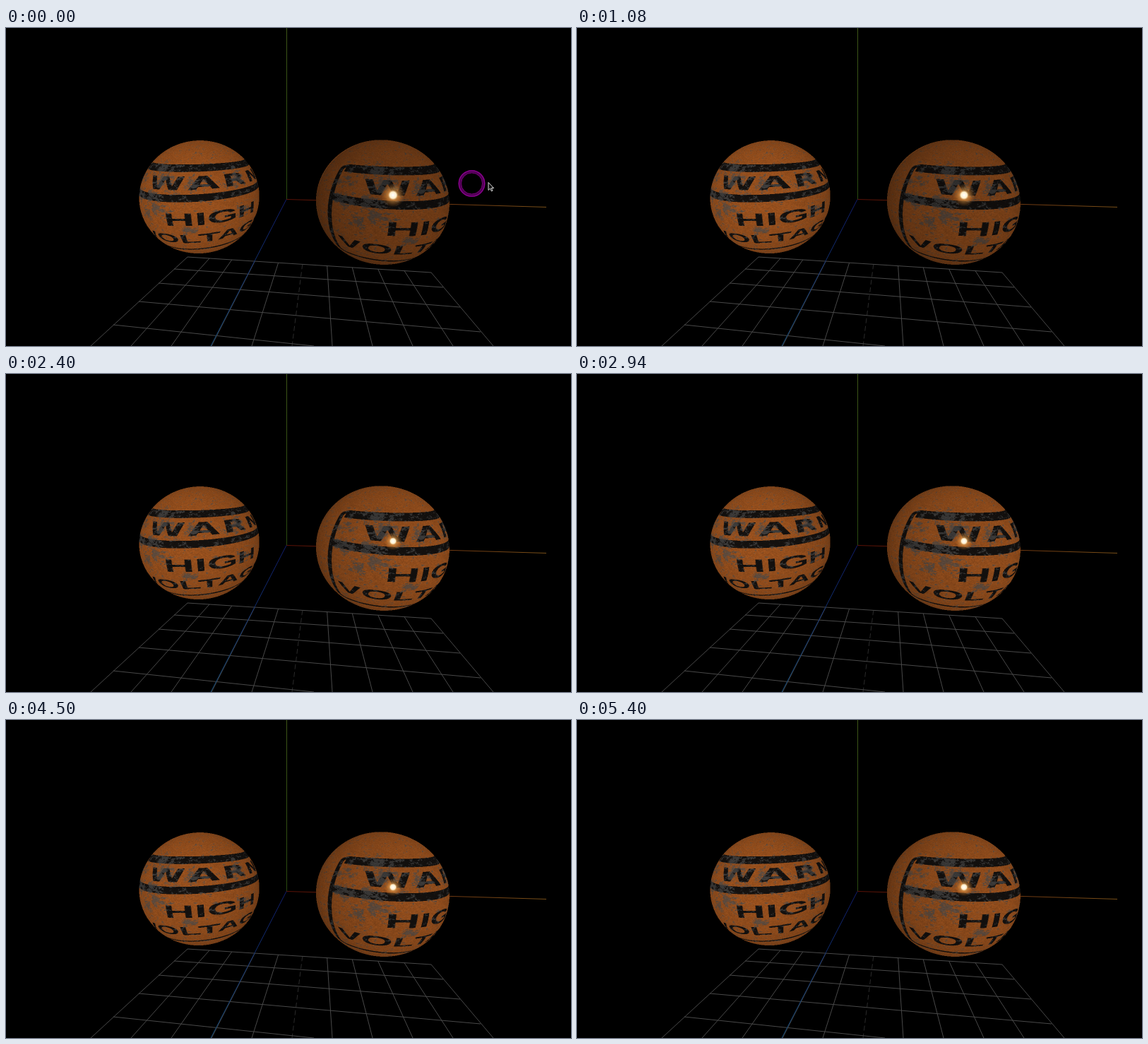
Write an HTML page with a canvas that moves like this. It is 800 px wide and 450 px high and loops after 5.7 s.

```html
<!DOCTYPE html>
<html lang="en">
<head>
<meta charset="utf-8">
<title>Two textured spheres</title>
<style>
html, body { margin: 0; width: 100%; height: 100%; overflow: hidden; background: #000; }
canvas { display: block; width: 800px; height: 450px; }
</style>
</head>
<body>
<canvas id="stage" width="800" height="450"></canvas>
<script>
const LOOP = 5700, W = 800, H = 450;
const ctx = document.getElementById('stage').getContext('2d');
const clamp = v => Math.max(0, Math.min(1, v));
const mix = (a, b, k) => a + (b - a) * k;

function makeCanvas(w, h) {
  const c = document.createElement('canvas');
  c.width = w;
  c.height = h;
  return c.getContext('2d', { willReadFrequently: true });
}

// ---- Sign texture: black print mask wrapped round the whole sphere ----
const TW = 930, TH = 1024;
const mapX = lon => (lon + 180) / 360 * TW;
const mapY = lat => (90 - lat) / 180 * TH;

function signMask() {
  const g = makeCanvas(TW, TH);
  const bar = (lon0, lon1, top, bottom) =>
    g.fillRect(mapX(lon0), mapY(top), mapX(lon1) - mapX(lon0), mapY(bottom) - mapY(top));
  const label = (text, lon, lat, em, face, gap = 0) => {
    g.font = `bold ${em / 180 * TH}px ${face}, sans-serif`;
    g.letterSpacing = gap + 'px';
    g.fillText(text, mapX(lon), mapY(lat));
  };
  g.lineWidth = 13;
  g.beginPath();
  g.roundRect(mapX(-53), mapY(40.5), mapX(138) - mapX(-53), mapY(-42) - mapY(40.5), 26);
  g.stroke();
  bar(-48, 134, 41, 34.5);
  bar(-53, 138, 15.3, 9.3);
  label('WARNING', -26, 19, 15.8, '"DejaVu Sans"', 9);
  label('HIGH', -7, -11, 16, '"Liberation Sans"');
  label('VOLTAGE', -46, -30.5, 15, '"Liberation Sans"');
  return g.getImageData(0, 0, TW, TH).data;
}

// ---- Seeded noise ----
function hash(x, y) {
  let h = Math.imul(x, 374761393) + Math.imul(y, 668265263) | 0;
  h = Math.imul(h ^ h >>> 13, 1274126177);
  return ((h ^ h >>> 16) >>> 0) / 4294967296;
}
function noise(x, y) {
  const ix = Math.floor(x), iy = Math.floor(y);
  const ease = v => v * v * (3 - 2 * v);
  const fx = ease(x - ix), fy = ease(y - iy);
  const row = j => mix(hash(ix, j), hash(ix + 1, j), fx);
  return mix(row(iy), row(iy + 1), fy);
}
const fbm = (x, y) =>
  .4 * noise(x, y) + .3 * noise(x * 2.3, y * 2.3) + .3 * noise(x * 5.1, y * 5.1);

// ---- Spheres, ray traced through a tilted camera ----
const FOCAL = 335, PITCH = .206, YAW = .122;
const spheres = [
  { x: 280.4, y: 238.3, dist: 4.58, box: [186, 156, 362, 322], gain: 1 },
  { x: 524.8, y: 245.2, dist: 4.2, box: [437, 156, 631, 338], gain: .95 }
];
// Worn spots: longitude, latitude, radius
const worn = [[-15, 3, 12], [-38, 12, 10], [-40, 27, 9], [-8, 27, 12], [20, 25, 9],
  [-18, 37, 10], [64, -4, 9], [60, 26, 12], [-26, -4, 9], [12, -15, 7], [-20, 15, 9]];

function surface(lon, lat, mask) {
  const i = Math.floor(mapY(lat)) * TW + Math.floor(mapX(lon));
  const ink = mask[i * 4 + 3] / 255;
  let near = 0;
  for (const [a, b, r] of worn)
    near = Math.max(near, 1 - Math.hypot((lon - a) * .7, lat - b) / r);
  const rough = fbm(lon / 4 + 90, lat / 2 + 90);
  const wear = clamp((rough + near * .3 - .64 + ink * .07) * 8) * .75;
  const grain = .9 + .2 * noise(lon * 1.6 + 500, lat * 2.6 + 500);
  const blotch = .9 + .2 * rough;
  return [[153, 20, 76], [81, 17, 75], [30, 15, 74]].map(([paint, black, metal]) =>
    mix(mix(paint * blotch, black, ink), metal, wear) * grain);
}

function renderSpheres() {
  const mask = signMask(), K = 2;
  const g = makeCanvas(W * K, H * K);
  const img = g.createImageData(W * K, H * K);
  const cp = Math.cos(PITCH), sp = Math.sin(PITCH), cy = Math.cos(YAW), sy = Math.sin(YAW);
  for (const s of spheres) {
    const c = [s.x - 400, 225 - s.y, -FOCAL];
    const scale = s.dist / Math.hypot(...c);
    const [cx, cY, cz] = c.map(v => v * scale);
    const [x0, y0, x1, y1] = s.box.map(v => v * K);
    for (let py = y0; py < y1; py++) for (let px = x0; px < x1; px++) {
      const rx = (px + .5) / K - 400, ry = 225 - (py + .5) / K;
      const len = Math.hypot(rx, ry, FOCAL);
      const b = (rx * cx + ry * cY - FOCAL * cz) / len;
      const disc = b * b - s.dist * s.dist + 1;
      if (disc < 0) continue;
      const t = (b - Math.sqrt(disc)) / len;
      const nx = rx * t - cx, ny = ry * t - cY, nz = -FOCAL * t - cz;
      const wy = ny * cp + nz * sp, depth = nz * cp - ny * sp;
      const wx = nx * cy + depth * sy, wz = depth * cy - nx * sy;
      const lon = Math.atan2(wx, wz) * 180 / Math.PI;
      const lat = Math.asin(wy) * 180 / Math.PI;
      const light = s.gain * (.7 + .3 * clamp(nx * .12 + ny * .1 + nz));
      const rgb = surface(lon, lat, mask);
      const o = (py * W * K + px) * 4;
      for (let k = 0; k < 3; k++) img.data[o + k] = rgb[k] * light;
      img.data[o + 3] = 255;
    }
  }
  g.putImageData(img, 0, 0);
  return g.canvas;
}

// ---- Lines ----
function line(x0, y0, x1, y1, from, to = from, dash = []) {
  const grad = ctx.createLinearGradient(x0, y0, x1, y1);
  grad.addColorStop(0, from);
  grad.addColorStop(1, to);
  ctx.strokeStyle = grad;
  ctx.lineWidth = 1;
  ctx.setLineDash(dash);
  ctx.beginPath();
  ctx.moveTo(x0, y0);
  ctx.lineTo(x1, y1);
  ctx.stroke();
  ctx.setLineDash([]);
}

function drawGrid() {
  const grey = '#484848', faint = '#2a2a2a';
  for (let i = 0; i <= 10; i++) {
    const x = 257 + 30.6 * i + .39 * i * i;
    const broken = i === 5;
    line(x, 324 + (x - 257) * .0638, 120 + 57 * i, 450,
      broken ? faint : grey, undefined, broken ? [7, 4] : []);
  }
  const rows = [[257, 324, 602, 346], [238, 341, 619, 367], [216, 361, 643, 395],
    [188, 387, 672, 430], [152, 420, 436, 450]];
  for (const r of rows) line(...r, grey);
}

function drawAxes() {
  line(397.5, 242, 397.5, 0, '#2a4a10', '#3e5618');
  line(397, 242.5, 765, 253.5, '#5a1006', '#7a5018');
  line(397, 242.5, 290, 450, '#101c6c', '#124a78');
}

// ---- Light on the right sphere: dim with a wide warm glint, then settling ----
function drawLight(t) {
  const dim = 1 - clamp((t - 960) / 540);
  ctx.fillStyle = `rgba(0,0,0,${.24 * dim})`;
  ctx.beginPath();
  ctx.ellipse(533.7, 246.7, 94.8, 88.7, 0, 0, 7);
  ctx.fill();

  const r = 13 + 4 * dim;
  const g = ctx.createRadialGradient(548, 236.5, 0, 548, 236.5, r);
  g.addColorStop(0, '#fff');
  g.addColorStop(.27, '#fff0cc');
  g.addColorStop(.42, 'rgba(240,165,80,.6)');
  g.addColorStop(1, 'rgba(200,110,30,0)');
  ctx.fillStyle = g;
  ctx.fillRect(548 - r, 236.5 - r, 2 * r, 2 * r);
}

// The arrow slows down to the right while its ring catches up
function drawPointer(t) {
  if (t >= 240) return;
  const left = 1 - Math.floor(t / 60) / 3;
  const moved = 1 - left * left;
  for (const [r, w, color] of [[17, 4, '#500054'], [18.2, 1.3, '#8c0090'], [15, 1, '#760079']]) {
    ctx.strokeStyle = color;
    ctx.lineWidth = w;
    ctx.beginPath();
    ctx.arc(mix(659.5, 762, moved), 220, r, 0, 7);
    ctx.stroke();
  }
  ctx.save();
  ctx.translate(mix(683, 762, moved), 218.5);
  const arrow = new Path2D('M0 0V11L2.6 8.6L4.4 12.4L6 11.6L4.3 8H7.6Z');
  ctx.fillStyle = '#111';
  ctx.strokeStyle = '#ddd';
  ctx.lineWidth = 1;
  ctx.fill(arrow);
  ctx.stroke(arrow);
  ctx.restore();
}

const balls = renderSpheres();

function frame(now) {
  const t = now % LOOP;
  ctx.fillStyle = '#000';
  ctx.fillRect(0, 0, W, H);
  drawGrid();
  drawAxes();
  ctx.drawImage(balls, 0, 0, W, H);
  drawLight(t);
  drawPointer(t);
  requestAnimationFrame(frame);
}
frame(performance.now());
</script>
</body>
</html>
```
